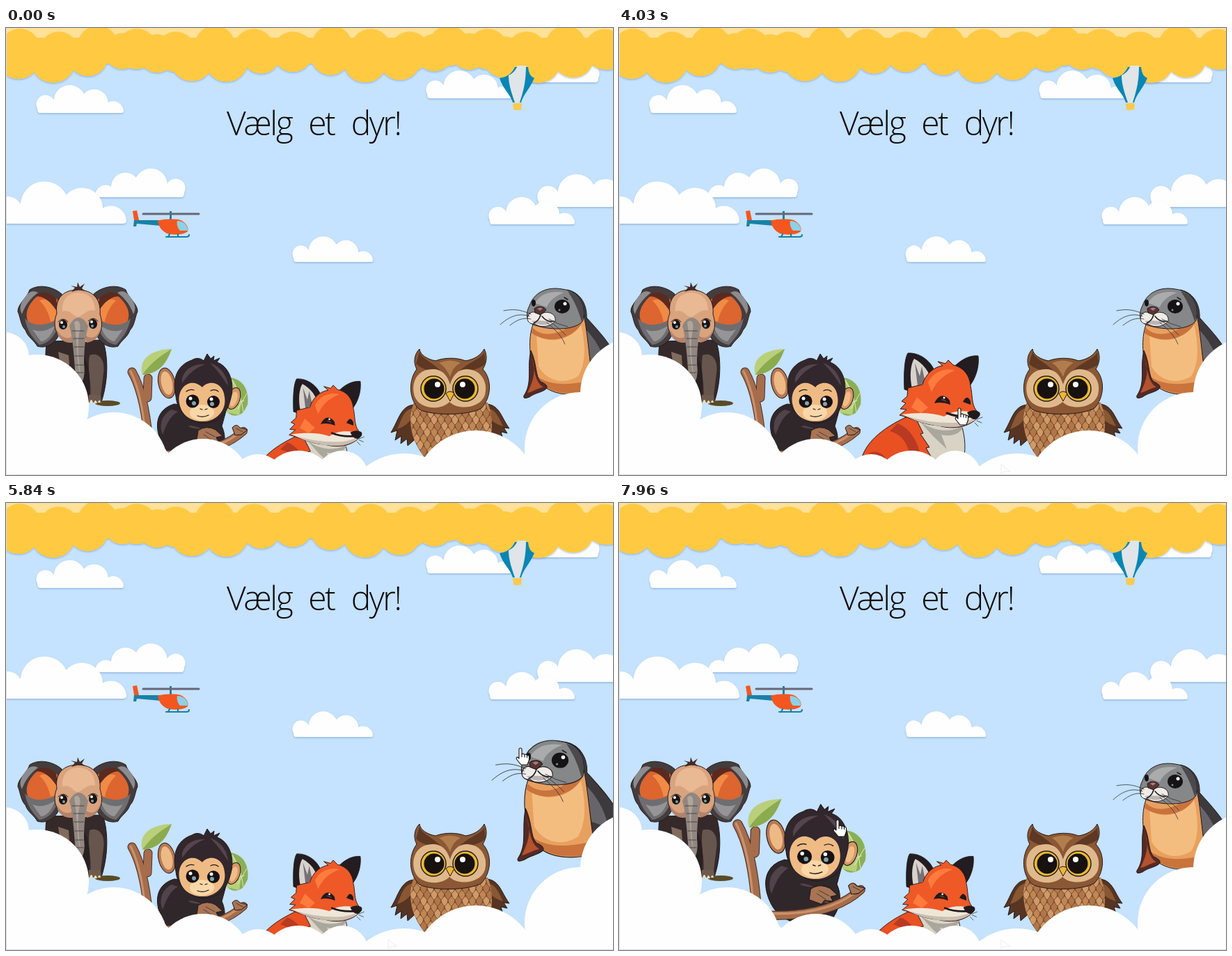
An HTML page that plays this animation: 872x642 px, repeating every 8 s.

```html
<!DOCTYPE html>
<html lang="da">
<head>
<meta charset="utf-8">
<title>Vælg et dyr!</title>
<style>
html, body { margin: 0; width: 100%; height: 100%; overflow: hidden; background: #c5e2fe; }
svg { display: block; width: 100%; height: 100%; }
.title { font: 300 48px "Open Sans", "Noto Sans", sans-serif; letter-spacing: -2.5px; word-spacing: 14px; fill: #0b0b0b; }
.ink { stroke: #211a1b; stroke-width: 1; stroke-linejoin: round; }
.line { fill: none; stroke: #211a1b; stroke-linecap: round; }
.hair { fill: none; stroke: #333; stroke-width: .8; stroke-linecap: round; }
</style>
</head>
<body>
<svg viewBox="0 0 872 642" preserveAspectRatio="none">
<defs>
  <filter id="soft" x="-10%" y="-10%" width="120%" height="130%">
    <feDropShadow dx="0" dy="1.5" stdDeviation="1" flood-color="#5c87b5" flood-opacity=".45"/>
  </filter>
  <clipPath id="belly"><path d="M586 538 C574 570 586 600 606 622 H676 C698 600 704 570 692 538Z"/></clipPath>
  <path id="cloud" d="M3 33 Q0 33 0 28 A10 10 0 0 1 19 18 A18.500 18.500 0 0 1 54 11 A16 16 0 0 1 82 21 A12 12 0 0 1 100 31 Q100 33 97 33Z"/>
  <g id="ear">
    <path class="ink" fill="#453c3d" d="M80 382 C66 370 46 368 34 376 C31 387 17 396 17 407 C21 416 21 427 28 434 C31 444 41 449 45 457 C57 461 72 454 78 436Z"/>
    <path fill="#8d8b8d" d="M31 382 C21 393 18 402 23 411 C27 399 35 388 46 380 C40 377 35 378 31 382Z"/>
    <path fill="#dc6530" d="M74 390 C62 378 46 381 39 391 C29 402 27 414 33 425 C48 431 62 426 75 419Z"/>
    <path fill="#f18a45" d="M73 402 C64 390 54 387 48 392 C56 398 62 411 64 422 L74 418Z"/>
    <path fill="#5a2a20" d="M72 388 C60 377 48 379 42 385 C55 385 65 393 75 410Z"/>
    <path fill="#6e6d70" d="M27 417 C40 431 58 427 77 418 C74 440 62 453 48 455 C38 445 30 434 27 417Z"/>
    <path fill="#969495" d="M38 433 C50 438 60 434 70 428 C66 442 57 450 50 450Z"/>
  </g>
</defs>
<rect width="872" height="642" fill="#c5e2fe"/>
<g id="sky" fill="#fefefe"></g>
<g id="roof"></g>

<g id="balloon">
  <path fill="#0a86b4" d="M709 72 Q725 70 731 56 H750 Q751 69 759 72 C752 88 744 94 740 107 H728 C724 94 714 88 709 72Z"/>
  <path fill="#dfe5e8" d="M722 68 C722 82 727 95 731 107 H738 C742 94 747 80 747 54 H735 Q731 64 722 68Z"/>
  <path fill="#fbc94c" d="M728 108 H741 L740 117 Q734 119 729 117Z"/>
</g>

<g id="helicopter">
  <path fill="#1881a8" d="M184 276 L222 276 V284 L188 281 L187 285 H183Z M235 263 h3 v14 h-3z"/>
  <path fill="#f4561f" d="M182 263 L188 262 L191 276 H184Z"/>
  <path fill="#f4561f" d="M218 277 C226 274 244 274 251 276 C259 280 263 287 261 292 C257 297 240 298 231 295 C223 291 219 284 218 277Z"/>
  <path fill="#8ed0e6" d="M246 277 C256 277 262 285 261 291 H250 C246 287 245 281 246 277Z"/>
  <path fill="none" stroke="#1881a8" stroke-width="2.2" stroke-linecap="round" d="M230 300 H259 Q263 300 263 297 M235 296 L233 300 M247 296 V300"/>
  <path stroke="#686776" stroke-width="3" stroke-linecap="round" d="M197 267 H277"/>
</g>

<text class="title" x="317" y="154">Vælg et dyr!</text>

<g id="elephant">
  <path class="ink" fill="#35292a" d="M60 450 C52 470 62 500 66 540 H117 L120 530 L137 537 C146 510 148 475 139 448Z"/>
  <path fill="#66564d" d="M120 470 C133 465 143 476 140 496 L135 536 H120 C125 515 116 495 120 470Z"/>
  <path fill="#816b5d" d="M75 465 L90 470 L93 515 L80 500Z"/>
  <path fill="#292022" d="M110 468 C121 485 122 508 118 532 L108 510Z"/>
  <ellipse cx="146" cy="539" rx="18" ry="4" fill="#594b26"/>
  <path fill="#6f5b4e" d="M119 527 h17 l1 11 h-18z"/>
  <path fill="#f0dcb8" d="M120 538 q2.500-8 5 0z M126 539 q2.500-8 5 0z M132 538 q2-7 4 0z"/>
  <use href="#ear"/><use href="#ear" transform="matrix(-1 0 0 1 206 0)"/>
  <path class="ink" fill="#d9a37e" d="M103 376 C82 376 70 389 73 410 C67 424 70 441 84 449 C96 454 120 454 128 446 C139 439 139 423 135 411 C137 389 124 376 103 376Z"/>
  <path fill="#e8b993" d="M103 380 C87 381 80 392 81 407 C92 403 96 414 103 415 C110 414 117 402 128 406 C128 389 118 380 103 380Z"/>
  <path fill="#b5836a" d="M73 433 C81 449 94 447 97 440 L95 452 C83 453 73 445 73 433Z M135 431 C132 446 120 448 113 440 L116 452 C128 450 135 443 135 431Z"/>
  <path fill="#918780" d="M91 428 C98 412 111 412 118 428 C114 446 112 460 112 482 Q114 498 110 507 H101 C98 482 97 448 91 428Z"/>
  <path fill="#b0a59b" d="M98 423 C103 417 108 422 106 434 C101 455 105 478 107 499 C101 480 103 453 98 423Z"/>
  <path class="hair" d="M95 435 h17 M97 446 h15 M98 458 h14 M99 471 h12 M100 484 h11 M100 495 h11"/>
  <path fill="#422a25" d="M94 379 L99 373 L93 370 L102 372 L103 365 L106 372 L113 367 L109 374 L114 378 L104 376Z"/>
  <g fill="#171415"><ellipse cx="82" cy="426" rx="6" ry="7"/><ellipse cx="125" cy="425" rx="6" ry="7"/></g>
  <g fill="#779cad"><circle cx="83" cy="429" r="2"/><circle cx="124" cy="428" r="2"/></g>
  <g fill="#fff"><circle cx="80" cy="423" r="2"/><circle cx="123" cy="422" r="2"/></g>
  <path class="line" d="M75 422 Q82 414 89 422 M118 421 Q125 413 132 421"/>
</g>

<g id="owl">
  <path class="ink" fill="#573522" d="M590 541 C567 540 565 562 553 581 L562 578 L559 592 L568 586 L567 597 L576 590 L577 600 L592 587Z"/>
  <path class="ink" fill="#573522" d="M688 540 C709 540 711 559 723 575 L715 574 L720 582 L711 580 L714 590 L705 586 L703 596 L686 582Z"/>
  <path fill="#8a5734" d="M588 546 C570 546 568 565 562 576 C575 572 585 563 588 546Z M690 546 C704 547 708 560 714 572 C700 568 691 560 690 546Z"/>
  <g clip-path="url(#belly)"><rect x="575" y="535" width="130" height="90" fill="#8b5935"/><g id="feathers"></g></g>
  <path class="ink" fill="#8b5734" d="M594 461 C595 470 606 476 617 478 C630 473 648 473 660 478 C673 476 682 470 687 461 C693 473 689 483 685 490 C699 505 697 531 683 546 C664 557 612 557 594 548 C578 533 578 506 590 490 C585 481 586 469 594 461Z"/>
  <path fill="#5d3823" d="M594 465 C598 478 620 481 633 504 L630 510 C617 489 598 493 589 482Z M687 465 C684 477 655 481 643 504 L646 510 C661 489 680 492 689 482Z"/>
  <path fill="#b27d4d" d="M622 481 Q638 474 653 481 Q642 486 638 501 Q632 487 622 481Z"/>
  <path fill="#dfb98c" d="M613 490 C590 490 581 510 587 529 C594 548 625 550 637 537 C650 550 682 546 688 527 C693 507 681 490 662 490 C648 490 641 501 638 512 C634 499 627 490 613 490Z"/>
  <g fill="#e9b936" stroke="#2b1c17" stroke-width="1.500"><circle cx="614" cy="518" r="18"/><circle cx="660" cy="518" r="18"/></g>
  <g fill="#17120f"><circle cx="615" cy="518" r="14.500"/><circle cx="659" cy="518" r="14.500"/></g>
  <g fill="#fff"><circle cx="620" cy="512" r="4"/><circle cx="656" cy="512" r="4"/></g>
  <path class="ink" fill="#eeb632" d="M632 525 Q638 519 644 525 L638 536Z"/>
</g>

<g id="seal">
  <path class="ink" fill="#3d393c" d="M806 376 C827 380 835 400 834 416 C850 434 870 454 880 480 V512 H820Z"/>
  <path fill="#68656a" d="M832 432 C846 446 858 465 862 488 L840 480Z"/>
  <path class="ink" fill="#e8a05f" d="M757 426 C750 446 751 475 762 503 C776 525 805 532 848 522 C838 495 838 450 830 412 L790 420Z"/>
  <path fill="#f4bd80" d="M762 440 C778 455 811 449 826 426 C833 456 833 482 822 500 C800 514 776 506 765 486Z"/>
  <path fill="#c9733d" d="M756 430 C771 446 801 442 822 416 L829 420 C818 447 779 456 755 438Z M762 500 C785 516 815 512 840 506 L843 522 C812 529 778 526 762 503Z"/>
  <path class="ink" fill="#552a25" d="M754 463 C763 482 760 500 768 508 C776 511 780 516 775 519 C768 524 760 524 752 530 Q742 534 744 528 C757 509 748 488 754 463Z"/>
  <path fill="#b4532e" d="M755 474 C762 492 758 506 749 524 C758 522 766 516 772 516 C759 508 760 491 755 474Z"/>
  <path class="ink" fill="#858789" d="M752 399 C758 380 777 371 799 375 C824 378 833 397 829 420 C820 434 785 435 760 427 C747 423 746 410 752 399Z"/>
  <path fill="#aaabad" d="M760 395 C768 381 784 377 802 380 C790 384 779 393 777 401Z"/>
  <path fill="#4b494c" d="M807 378 C830 384 833 407 827 422 C824 412 820 397 807 378Z"/>
  <path class="ink" fill="#efebe7" d="M752 410 C758 405 764 411 770 410 C780 405 791 412 789 421 C780 431 766 430 760 425 C750 426 746 418 752 410Z"/>
  <path fill="#bab5b3" d="M755 421 Q767 419 786 422 Q775 429 762 425Z"/>
  <path class="ink" fill="#593534" d="M759 403 C765 398 773 400 776 405 L768 412 L760 409Z"/>
  <path fill="#a77b75" d="M763 403 q5-3 8 0 l-4 3z"/>
  <ellipse cx="799" cy="400" rx="11" ry="10" fill="#151315"/><ellipse cx="758" cy="395" rx="3" ry="5" fill="#151315"/>
  <circle cx="803" cy="396" r="2.500" fill="#fff"/><circle cx="795" cy="405" r="1.500" fill="#8b8789"/>
  <path class="line" stroke-width="1.500" d="M768 412 Q766 420 758 424 M770 414 Q777 423 787 421 M802 387 l5 3"/>
  <path class="hair" d="M754 411 C737 403 726 404 715 406 M752 414 C735 408 721 416 710 426 M754 418 C742 415 733 420 724 427 M780 418 Q793 426 807 429 M779 420 Q796 432 804 441 M777 423 Q798 440 803 454"/>
</g>

<g id="monkey">
  <path class="line" style="stroke:#4b2f27" stroke-width="13" stroke-linejoin="round" d="M181 494 Q203 532 207 626 M203 531 L204 503"/>
  <path class="line" style="stroke:#a66d4c" stroke-width="11" d="M181 494 Q203 532 207 626 M203 531 L204 503"/>
  <path class="line" style="stroke:#cb916a" stroke-width="3" d="M179 493 Q198 530 202 612"/>
  <path fill="#b9cf7a" d="M196 498 C190 478 205 462 238 461 C232 475 225 496 196 498Z"/>
  <path fill="#8bab4e" d="M196 498 C206 483 220 472 238 461 C233 474 225 496 196 498Z"/>
  <path fill="#8baf55" d="M322 502 C340 504 350 520 347 541 L341 552 C328 563 311 553 316 538Z"/>
  <path fill="#b6cf78" d="M325 504 C335 520 340 534 335 556 L317 552 L318 538Z"/>
  <path class="hair" style="stroke:#f2f3db" d="M325 506 Q338 525 341 552 M346 525 L333 547 M316 545 L342 535"/>
  <path class="ink" fill="#30272b" d="M242 540 C221 546 214 563 219 583 C224 602 236 617 257 622 H300 C314 605 318 589 310 572 L316 550Z"/>
  <path fill="#51434a" d="M238 548 C224 555 219 570 225 584 C231 569 235 558 247 551Z M263 571 C277 571 296 582 301 599 C286 590 273 590 258 589Z"/>
  <path class="line" style="stroke:#4b2f27" stroke-width="12" d="M212 612 Q300 616 341 579"/>
  <path class="line" style="stroke:#a66d4c" stroke-width="10" d="M212 612 Q300 616 341 579"/>
  <path class="line" style="stroke:#cb916a" stroke-width="3" d="M226 610 Q300 612 338 579"/>
  <ellipse class="ink" cx="231" cy="510" rx="12" ry="22" transform="rotate(-12 231 510)" fill="#b87852"/>
  <ellipse cx="231" cy="510" rx="8" ry="17" transform="rotate(-12 231 510)" fill="#edb985"/>
  <ellipse class="ink" cx="327" cy="532" rx="9" ry="16" transform="rotate(18 327 532)" fill="#d89667"/>
  <ellipse cx="327" cy="533" rx="5" ry="11" transform="rotate(18 327 533)" fill="#f0bd87"/>
  <path class="ink" fill="#32272d" d="M244 529 C238 504 246 484 267 477 C273 473 280 474 284 478 L289 468 L294 475 L299 471 L298 478 L307 474 L303 480 C321 486 330 511 322 535 C316 558 303 567 282 568 C262 564 246 551 244 529Z"/>
  <path fill="#54454c" d="M253 503 C257 489 270 482 286 483 C272 488 262 497 253 510Z M293 481 C308 486 318 499 319 514 C310 500 303 491 293 481Z"/>
  <path fill="#efbb84" d="M282 516 C265 500 245 517 249 539 C253 560 270 566 286 565 C304 563 317 548 314 530 C312 508 291 505 282 516Z"/>
  <path fill="#f9d7a8" d="M281 541 C266 541 260 552 267 559 C279 568 295 563 299 554 C300 547 294 542 281 541Z"/>
  <g fill="#171113"><circle cx="268" cy="536" r="9.500"/><circle cx="298" cy="537" r="9"/></g>
  <g fill="#81a4ae"><circle cx="270" cy="539" r="3"/><circle cx="296" cy="540" r="3"/></g>
  <g fill="#fff"><circle cx="265" cy="532" r="2.500"/><circle cx="295" cy="533" r="2.500"/></g>
  <path class="line" stroke-width="1.300" d="M279 547 l3 1 M286 548 l3-1 M275 557 Q283 560 291 556 M259 522 q5-4 11-2 M294 521 q6-3 11 1"/>
  <path class="line" style="stroke:#30272b" stroke-width="17" d="M243 568 Q258 586 283 584"/>
  <path class="ink" fill="#a87454" d="M276 578 Q288 570 301 577 L311 586 L302 588 L305 594 L294 593 L290 598 L274 592Z M325 574 Q331 567 336 574 L347 577 L338 584 L329 585Z"/>
  <path class="hair" d="M287 580 l13 7 M284 584 l12 8 M331 575 l9 5"/>
</g>

<g id="fox">
  <path class="ink" fill="#e95022" d="M346 630 C349 602 369 580 410 560 L450 545 L493 578 V632Z"/>
  <path fill="#b83a23" d="M350 617 C368 600 384 612 386 626 H348Z M389 579 C412 585 420 607 417 629 H436 C432 595 418 574 400 568Z"/>
  <path class="ink" fill="#d9d3c5" d="M428 564 L437 582 L433 583 L446 602 L441 603 L457 631 H493 C499 605 498 590 491 566Z"/>
  <path fill="#aaa79d" d="M432 565 C457 583 482 580 495 570 C493 582 478 588 463 584 L471 605 L451 586Z"/>
  <path class="ink" fill="#231c20" d="M410 519 C409 497 410 475 415 467 C431 466 447 477 453 492 L428 525Z M482 486 C494 474 506 470 516 471 C518 488 511 507 501 517Z"/>
  <path fill="#d7d2cc" d="M421 518 C417 500 419 483 424 475 C436 481 447 494 449 509Z"/>
  <path fill="#777177" d="M429 514 L425 481 L432 500 L435 486 L440 509Z"/>
  <path class="ink" fill="#ee5927" d="M415 517 L436 512 C440 498 451 487 465 485 L458 479 L469 482 L473 477 L480 484 C494 487 504 498 505 514 C508 526 506 540 513 549 L518 556 C507 572 483 578 459 571 C437 570 420 560 403 556 L413 548 L404 547 L412 539 L406 536 L414 529Z"/>
  <path fill="#ff7b3d" d="M444 509 C451 494 469 487 483 492 C470 496 456 506 449 523Z M420 545 L428 530 L444 545 L434 553Z"/>
  <path fill="#f0e6d8" d="M406 555 C430 552 449 552 467 558 C481 549 492 549 511 552 L516 558 C505 572 477 576 456 570 C436 569 421 561 406 555Z"/>
  <path fill="#c8beb1" d="M412 557 Q442 567 478 567 Q501 567 514 558 Q500 575 471 573 Q435 570 412 557Z"/>
  <path fill="#211a1d" d="M500 552 Q511 546 518 552 Q521 557 512 562 Q505 563 500 552Z"/>
  <path class="line" stroke-width="3" d="M471 553 Q485 559 505 558"/>
  <path fill="#211a1d" d="M453 539 C459 526 468 525 475 535 L476 541 Q464 536 453 539Z M494 537 Q500 525 505 536 V541Z"/>
  <path fill="#7b3720" d="M462 534 q5-3 9 3z"/>
  <circle cx="467" cy="531" r="1.500" fill="#fff"/>
  <path class="hair" d="M514 562 l8-3 M514 564 l7 3 M511 567 l5 5"/>
</g>

<g id="ground" fill="#fefefe">
  <path d="M0 470 H45 L110 580 H200 L260 634 H740 L826 560 L872 500 V642 H0Z"/>
  <circle cx="-2" cy="472" r="35"/><circle cx="45" cy="543" r="74"/><circle cx="155" cy="630" r="78"/>
  <circle cx="283" cy="660" r="70"/><circle cx="362" cy="650" r="38"/><circle cx="420" cy="660" r="53"/>
  <circle cx="483" cy="645" r="38"/><circle cx="572" cy="700" r="89"/><circle cx="675" cy="667" r="89"/>
  <circle cx="825" cy="603" r="80"/><circle cx="906" cy="525" r="81"/>
</g>
<path id="ghost" fill="none" stroke="#ededed" d="M549 627 V640 L553 637 H562Z"/>
<path d="M.5 0 V641.500 H872" fill="none" stroke="#d9dde2"/>
<g id="pointer" stroke="#111" stroke-width="1.100" stroke-linejoin="round" fill="#fff">
  <path id="arrow" d="M0 0 V16 L4 12.500 L7 19 L10 17.500 L7 11.500 H12Z"/>
  <path id="hand" d="M-2 2 Q-2 0 0 0 Q2 0 2 2 V9 Q4 7 6 9.500 Q8 8 9.500 10.500 Q12 9.500 12.500 12.500 V17 L10 24 H1 L-5.500 16 Q-6.500 13 -4 13 L-2 15Z M2 9 V13 M6 9.500 V13.500 M9.500 10.500 V14"/>
</g>
</svg>
<script>
const $ = id => document.getElementById(id);
const clamp = v => Math.min(1, Math.max(0, v));
const lerp = (a, b, p) => a + (b - a) * p;
const repeat = (n, make) => Array.from({ length: n }, (_, i) => make(i)).join('');

// one cloud shape; a negative width mirrors it
function cloud(x, base, width) {
  const k = width / 100, h = Math.abs(k);
  return `<g filter="url(#soft)"><use href="#cloud" transform="translate(${x} ${base - 33 * h}) scale(${k} ${h})"/></g>`;
}
$('sky').innerHTML = cloud(45, 122, 124) + cloud(605, 101, 124) + cloud(851, 78, -120) + cloud(256, 243, -128) +
  cloud(-15, 281, 188) + cloud(413, 336, 114) + cloud(765, 257, 146) + cloud(695, 282, 122);

// scalloped curtain: puffs hang along a slow wave
function fringe(i) {
  const x = 18 + 49.8 * i, swing = Math.cos((x - 60) / 37.4);
  return `<circle cx="${x}" cy="${40 + 7 * swing}" r="${29 + 3 * swing}"/>`;
}
const crest = i => `<circle cx="${20 + 56 * i}" cy="${30 + 5 * Math.sin(2.1 * i)}" r="29"/>`;
$('roof').innerHTML = `<rect width="872" height="35" fill="#ffe197"/>
  <g fill="#ffca42" filter="url(#soft)"><rect y="14" width="872" height="37"/>${repeat(18, fringe)}${repeat(16, crest)}</g>`;

// rows of feathers from the bottom up, so upper rows overlap lower ones
function feather(n) {
  const row = 8 - Math.floor(n / 13), col = n % 13;
  const x = 575 + col * 10 + row % 2 * 5, y = 543 + row * 9;
  const tone = ['#c08654', '#b0764a', '#cf9a68'][(col + row * 2) % 3];
  return `<path d="M${x - 6} ${y - 5} q1 11 6 14 q5 -3 6 -14z" fill="${tone}" stroke="#6b4329" stroke-width=".8"/>`;
}
$('feathers').innerHTML = repeat(9 * 13, feather);

// the CSS "ease" curve
function ease(x) {
  if (x <= 0 || x >= 1) return clamp(x);
  let a = 0, b = 1;
  for (let i = 0; i < 18; i++) {
    const m = (a + b) / 2;
    if (.75 * m * (1 - m) + m ** 3 < x) a = m; else b = m;
  }
  return .3 * a * (1 - a) ** 2 + 3 * a * a * (1 - a) + a ** 3;
}

// poses are x, y, scale; enter and leave are hover times
const still = [0, 0, 1];
const actors = [
  { id: 'fox', rest: [42, 81.3, .905], lift: still, enter: 1270, leave: 4130 },
  { id: 'seal', rest: still, lift: [-82.9, -70.4, 1.1], enter: 4380, leave: 5890 },
  { id: 'monkey', rest: still, lift: [-29.6, -84.4, 1.105], enter: 6285, leave: 9000 }
];

// pointer hops: start and end time, then a quadratic curve
const hops = [
  { from: 1070, to: 1600, curve: [[552, 628], [505, 600], [485, 555]] },
  { from: 4030, to: 4620, curve: [[489, 546], [640, 420], [829, 385]] },
  { from: 4620, to: 4760, curve: [[829, 385], [800, 370], [758, 366]] },
  { from: 5840, to: 6390, curve: [[739, 352], [600, 230], [276, 508]] },
  { from: 7880, to: 7960, curve: [[282, 498], [298, 476], [314, 455]] }
];

function pointerAt(t) {
  const { from, to, curve: [a, b, c] } = hops.findLast(h => t >= h.from) || hops[0];
  const u = clamp((t - from) / (to - from)), p = u * u * (3 - 2 * u);
  return [0, 1].map(i => lerp(lerp(a[i], b[i], p), lerp(b[i], c[i], p), p));
}

const show = (id, on) => $(id).setAttribute('visibility', on ? 'inherit' : 'hidden');

function draw(t) {
  for (const { id, rest, lift, enter, leave } of actors) {
    const p = ease((t - enter) / 400) - ease((t - leave) / 400);
    const [x, y, s] = rest.map((v, i) => lerp(v, lift[i], p));
    $(id).setAttribute('transform', `translate(${x} ${y}) scale(${s})`);
  }
  const hovering = actors.some(a => t >= a.enter && t < a.leave);
  $('pointer').setAttribute('transform', `translate(${pointerAt(t)})`);
  show('pointer', t >= hops[0].from);
  show('hand', hovering);
  show('arrow', !hovering);
  show('ghost', t >= 1130);
}

const start = performance.now();
function tick() {
  draw((performance.now() - start) % 8000);
  requestAnimationFrame(tick);
}
tick();
</script>
</body>
</html>
```
